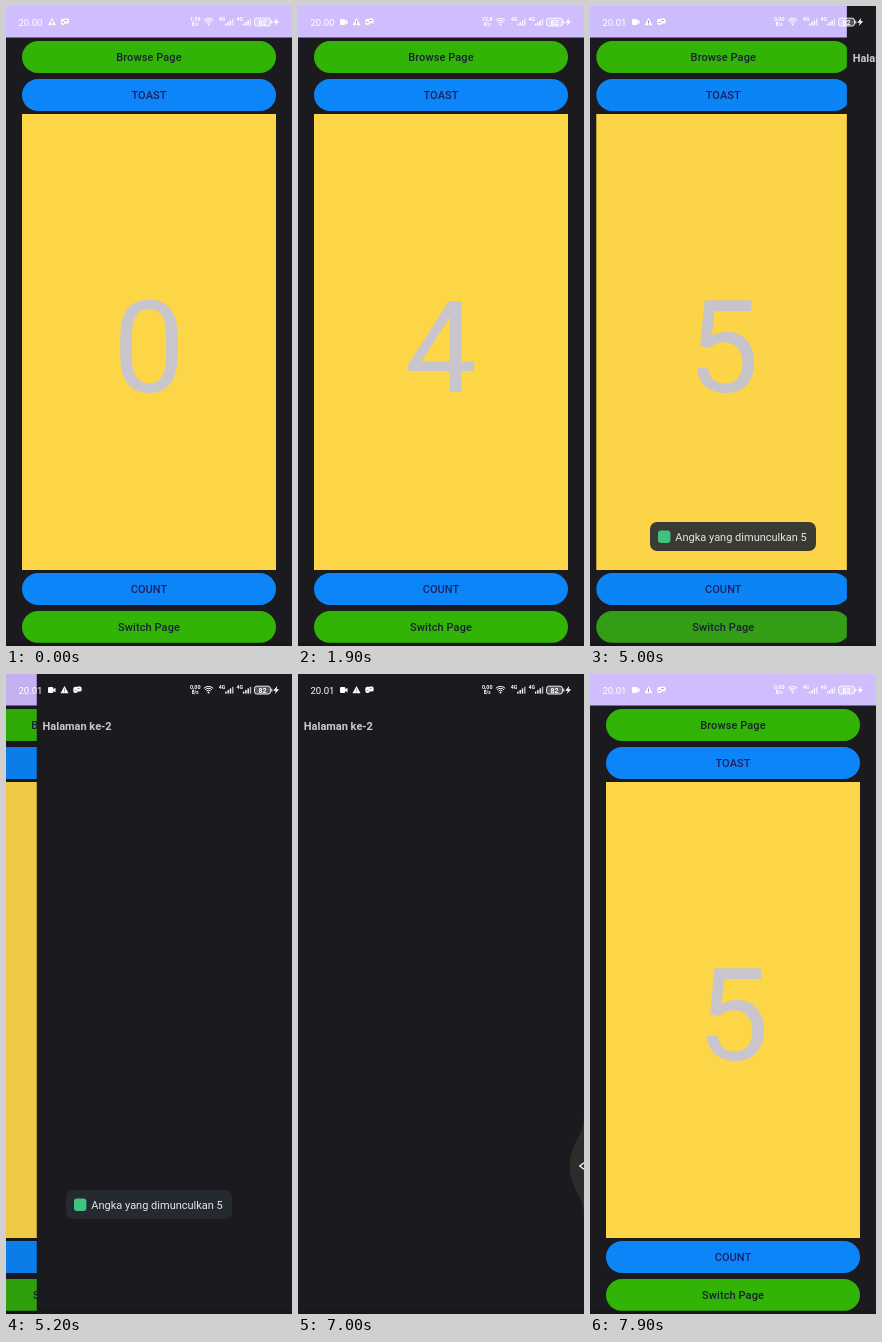
These frames come from a looping animation (286x640 px, 8 s). An HTML page with a canvas:

```html
<!DOCTYPE html>
<html lang="id">
<head>
<meta charset="utf-8">
<title>Counter app</title>
<style>
  html, body { margin: 0; width: 100%; height: 100%; overflow: hidden; background: #1b1b1f; }
  canvas { display: block; width: 286px; height: 640px; }
</style>
</head>
<body>
<canvas id="stage"></canvas>
<script>
const W = 286, H = 640, LOOP = 8000;
const DARK = '#1b1b1f', GREEN = '#32b406', BLUE = '#0b85f8';
const canvas = document.getElementById('stage');
const g = canvas.getContext('2d');
const ratio = window.devicePixelRatio || 1;
canvas.width = W * ratio;
canvas.height = H * ratio;

const buttons = {
  browse: { y: 35, label: 'Browse Page', fill: GREEN, ink: '#1c2036', base: 55.2 },
  toast: { y: 73, label: 'TOAST', fill: BLUE, ink: '#1c2266', base: 93.2 },
  count: { y: 567, label: 'COUNT', fill: BLUE, ink: '#1c2266', base: 587.2 },
  next: { y: 605, label: 'Switch Page', fill: GREEN, ink: '#1c2036', base: 625.4 }
};
const countTimes = [200, 400, 1100, 1400, 2000];
const taps = [
  ...countTimes.map(t => ({ button: 'count', at: t - 80, x: 160 })),
  { button: 'toast', at: 2810, x: 150 },
  { button: 'next', at: 4810, x: 150 }
];

const clamp = v => Math.max(0, Math.min(1, v));
const ramp = (t, from, to) => clamp((t - from) / (to - from));
const easeOut = v => 1 - (1 - v) ** 3;

// Critically damped spring used by both page transitions.
function spring(t, start) {
  const s = Math.max(0, t - start) * 0.0163;
  return 1 - (1 + s) * Math.exp(-s);
}

function text(str, x, y, size, color, weight = 400, align = 'left', spacing = 0) {
  g.font = `${weight} ${size}px Roboto, sans-serif`;
  g.letterSpacing = spacing + 'px';
  g.textAlign = align;
  g.fillStyle = color;
  g.fillText(str, x, y);
}

function rect(x, y, w, h, color) {
  g.fillStyle = color;
  g.fillRect(x, y, w, h);
}

function round(x, y, w, h, r, color) {
  g.beginPath();
  g.roundRect(x, y, w, h, r);
  g.fillStyle = color;
  g.fill();
}

function poly(points, color) {
  g.beginPath();
  points.forEach(([x, y]) => g.lineTo(x, y));
  g.closePath();
  g.fillStyle = color;
  g.fill();
}

function drawRipple(b, tap, t) {
  const age = t - tap.at;
  if (age < 0 || age > 500) return;
  g.save();
  g.beginPath();
  g.roundRect(16, b.y, 254, 32, 16);
  g.clip();
  g.globalAlpha = 0.14 * ramp(age, 0, 70) * (1 - ramp(age, 220, 500));
  g.beginPath();
  g.arc(tap.x, b.y + 16, 20 + 130 * easeOut(ramp(age, 0, 250)), 0, 7);
  g.fillStyle = '#381e72';
  g.fill();
  g.restore();
}

function drawHome(t) {
  rect(0, 0, W, H, DARK);
  rect(0, 0, W, 31.5, '#cfbdfe');
  rect(16, 108, 254, 456, '#fdd648');
  const count = countTimes.filter(at => t >= at).length;
  text(String(count), 143, 385.6, 128, '#c9c5cd', 400, 'center');
  for (const key in buttons) {
    const b = buttons[key];
    round(16, b.y, 254, 32, 16, b.fill);
    taps.filter(tap => tap.button === key).forEach(tap => drawRipple(b, tap, t));
    text(b.label, 143, b.base, 11, b.ink, 500, 'center', 0.08);
  }
}

function drawPages(t) {
  const cover = t < 6500 ? spring(t, 4968) : 1 - spring(t, 7068);
  const edge = W * (1 - cover);
  g.save();
  g.translate(-W * cover / 3, 0);
  drawHome(t);
  g.restore();
  if (cover > 0.0005) {
    rect(0, 0, edge, H, `rgba(0,0,0,${0.07 * cover})`);
    rect(edge, 0, W - edge, H, DARK);
    text('Halaman ke-2', edge + 5.8, 56.2, 11, '#cbc8ce', 700);
  }
  rect(0, 636.5, W, 3.5, 'rgba(18,18,22,.45)');
}

function drawWifi() {
  g.strokeStyle = '#fff';
  g.lineWidth = 1;
  for (const r of [2.8, 4.7, 6.6]) {
    g.beginPath();
    g.arc(202.5, 19, r, -Math.PI * 0.75, -Math.PI * 0.25);
    g.stroke();
  }
  g.beginPath();
  g.arc(202.5, 18.6, 1, 0, 7);
  g.fillStyle = '#fff';
  g.fill();
}

function drawSignal(x) {
  text('4G', x, 15.4, 5.2, '#fff', 700);
  for (let i = 0; i < 4; i++) {
    const h = 2 + i * 1.6;
    rect(x + 6.4 + i * 2.3, 19.6 - h, 1.4, h, i < 3 ? '#fff' : 'rgba(255,255,255,.7)');
  }
}

function drawNotices(recording) {
  const x = recording ? 54.5 : 42;
  if (recording) {
    round(42, 13, 5.3, 6, 1.2, '#fff');
    poly([[47, 15.5], [49.5, 13.8], [49.5, 18.4], [47, 16.8]], '#fff');
  }
  poly([[x + 4, 12], [x + 8, 19.3], [x, 19.3]], '#fff');
  rect(x + 3.6, 14.6, 0.9, 2.2, '#777');
  rect(x + 3.6, 17.5, 0.9, 0.9, '#777');
  round(x + 12.8, 12.8, 4.4, 6.2, 2, '#fff');
  round(x + 15.5, 12.5, 5.6, 5, 1.6, '#fff');
  rect(x + 16.6, 14.3, 2.7, 0.8, '#888');
  rect(x + 14, 16.2, 2, 0.8, '#888');
}

function drawBattery() {
  round(248.5, 12.2, 16, 7.8, 2.2, 'rgba(255,255,255,.28)');
  g.strokeStyle = '#fff';
  g.lineWidth = 0.9;
  g.stroke();
  rect(265.3, 14.6, 1, 3, '#fff');
  text('82', 256.5, 18.6, 7, '#fff', 700, 'center');
  poly([[271.2, 12], [267.2, 16.8], [269.8, 16.8], [268.8, 20], [273.2, 15.2], [270.6, 15.2]], '#fff');
}

function drawStatus(t) {
  let speed = '1,58', unit = 'K/s';
  if (t >= 1000) speed = '72,8';
  if (t >= 3700) speed = '0,09';
  if (t >= 4800) { speed = '0,00'; unit = 'B/s'; }
  text(t < 2900 ? '20.00' : '20.01', 12.4, 19.5, 9.6, '#fff');
  drawNotices(t >= 300);
  text(speed, 189.2, 15.2, 5.4, '#fff', 700, 'center');
  text(unit, 189.2, 19.8, 4.6, '#fff', 700, 'center');
  drawWifi();
  drawSignal(212.8);
  drawSignal(230.5);
  drawBattery();
}

function drawToast(t) {
  const alpha = ramp(t, 2880, 3150) * (1 - ramp(t, 5560, 5820));
  if (!alpha) return;
  g.save();
  g.globalAlpha = alpha;
  round(60, 516, 166, 29, 7, 'rgba(38,43,50,.9)');
  round(68, 524.5, 12.4, 12.4, 3, '#3fc380');
  text('Angka yang dimunculkan 5', 85.3, 534.8, 11, '#e4e5e6');
  g.restore();
}

function drawBackHandle(t) {
  const size = easeOut(ramp(t, 6660, 6860)) * (1 - ramp(t, 6930, 7110) ** 2);
  if (size <= 0) return;
  const x = W - 16.8 * size, y = 492;
  g.beginPath();
  g.moveTo(W, y - 50);
  g.bezierCurveTo(W, y - 28, x, y - 24, x, y);
  g.bezierCurveTo(x, y + 24, W, y + 28, W, y + 50);
  g.fillStyle = '#2d2c2b';
  g.fill();
  const tip = x + 10;
  g.beginPath();
  g.moveTo(tip + 4, y - 3.2);
  g.lineTo(tip, y);
  g.lineTo(tip + 4, y + 3.2);
  g.strokeStyle = '#fff';
  g.lineWidth = 1.3;
  g.stroke();
}

function draw(now) {
  const t = now % LOOP;
  g.setTransform(ratio, 0, 0, ratio, 0, 0);
  drawPages(t);
  drawStatus(t);
  drawToast(t);
  drawBackHandle(t);
}

const start = performance.now();
function tick() {
  draw(performance.now() - start);
  requestAnimationFrame(tick);
}
tick();
</script>
</body>
</html>
```
